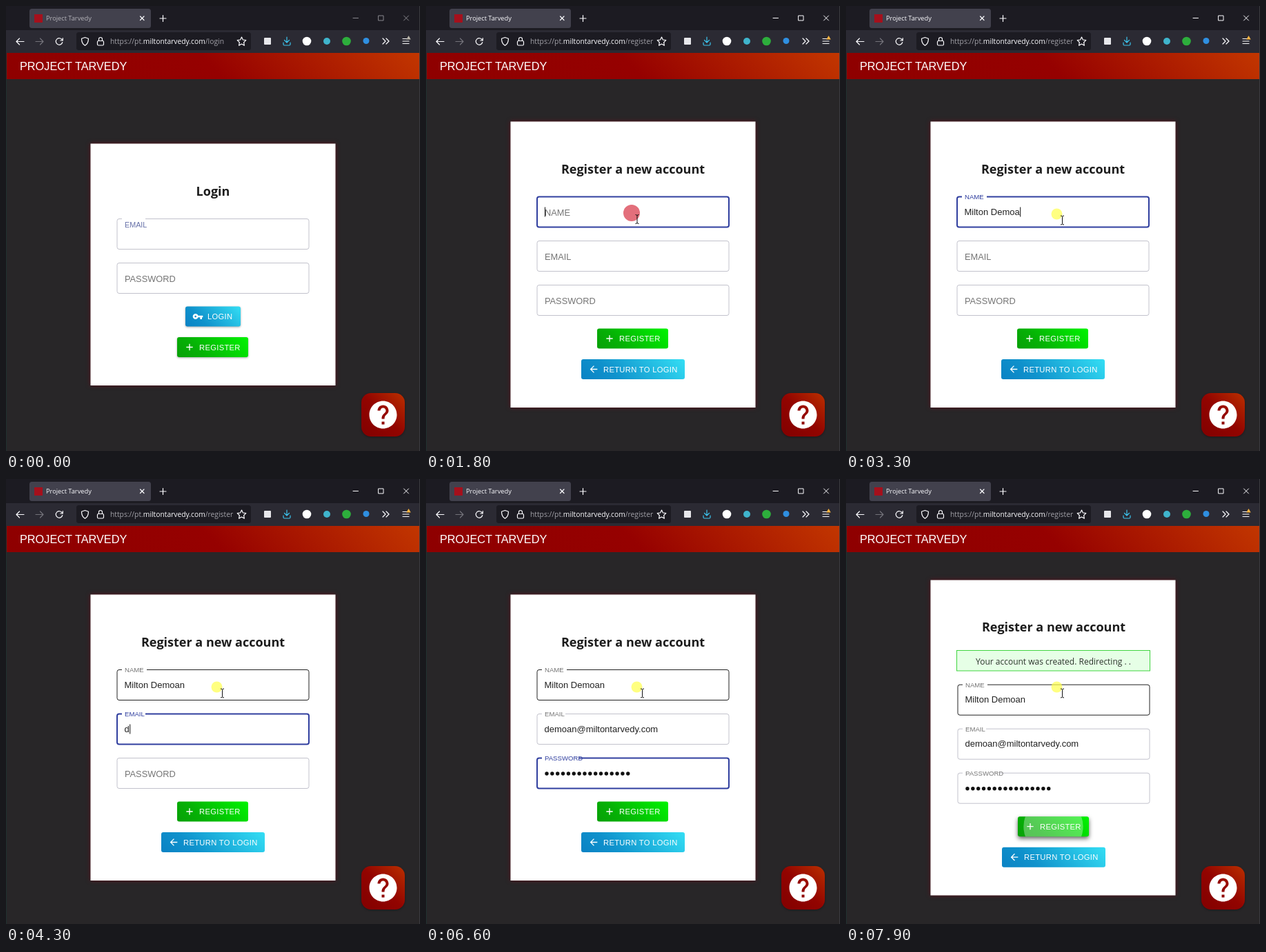
Recreate the animation shown at these times as an HTML page. Size 600 by 645 pixels, loop 8000 ms.

```html
<!DOCTYPE html>
<html lang="en">
<head>
<meta charset="utf-8">
<title>Register demo</title>
<style>
html, body { margin: 0; width: 100%; height: 100%; overflow: hidden; background: #282628; }
svg { display: block; width: 600px; height: 645px; }
text { font-family: "Liberation Sans", Arial, sans-serif; white-space: pre; }
.ui { font-family: "Open Sans", "Noto Sans", sans-serif; }
.mid { text-anchor: middle; }
.title { font-weight: 700; }
.btn { letter-spacing: .32px; }
.line { fill: none; stroke: #fbfbfe; stroke-width: 1.2; stroke-linecap: round; stroke-linejoin: round; }
.card { filter: drop-shadow(0 0 3px #7a001099); }
.low { filter: drop-shadow(0 1px 1.5px #0005); }
.high { filter: drop-shadow(0 3px 3px #0009); }
</style>
</head>
<body>
<svg id="stage" viewBox="0 0 600 645"></svg>
<script>
const LOOP = 8000, SITE = 'miltontarvedy.com', NAME = 'Milton Demoan', EMAIL = 'demoan@' + SITE;
const BLUE = '#303f9f', VALUE = 13;
const ICON = {
  help: 'M12 2C6.48 2 2 6.48 2 12s4.48 10 10 10 10-4.48 10-10S17.52 2 12 2zm1 17h-2v-2h2v2zm2.07-7.75l-.9.92C13.45 12.9 13 13.5 13 15h-2v-.5c0-1.1.45-2.1 1.17-2.83l1.24-1.26c.37-.36.59-.86.59-1.41 0-1.1-.9-2-2-2s-2 .9-2 2H8c0-2.21 1.79-4 4-4s4 1.79 4 4c0 .88-.36 1.68-.93 2.25z',
  key: 'M12.65 10C11.83 7.67 9.61 6 7 6c-3.31 0-6 2.69-6 6s2.69 6 6 6c2.61 0 4.83-1.67 5.65-4H17v4h4v-4h2v-4H12.65zM7 14c-1.1 0-2-.9-2-2s.9-2 2-2 2 .9 2 2-.9 2-2 2z',
  plus: 'M19 13h-6v6h-2v-6H5v-2h6V5h2v6h6v2z',
  back: 'M20 11H7.83l5.59-5.59L12 4l-8 8 8 8 1.41-1.41L7.83 13H20v-2z'
};

// Moments of the story, in ms
const T = { hover: 1150, activate: 1300, page: 1600, name: 1790, email: 3600, pass: 5900, button: 6800, done: 7300 };

const clamp = v => Math.max(0, Math.min(1, v));
const out = v => 1 - (1 - clamp(v)) ** 3;
const rect = (x, y, w, h, fill, more = '') => `<rect x="${x}" y="${y}" width="${w}" height="${h}" fill="${fill}" ${more}/>`;
const dot = (x, y, r, fill, more = '') => `<circle cx="${x}" cy="${y}" r="${r}" fill="${fill}" ${more}/>`;
const text = (x, y, s, size, fill, more = '') => `<text x="${x}" y="${y}" font-size="${size}" fill="${fill}" ${more}>${s}</text>`;
const line = (d, more = '') => `<path class="line" d="${d}" ${more}/>`;
const icon = (name, x, y, size, fill = '#fff') =>
  `<path d="${ICON[name]}" fill="${fill}" transform="translate(${x} ${y}) scale(${size / 24})"/>`;
const at = (x, y, s, more = '') => `<g transform="translate(${x} ${y})" ${more}>${s}</g>`;

// 45 degree gradient for a box centred on the origin
function slope(id, w, h, ...stops) {
  const k = (w + h) / 4;
  return `<linearGradient id="${id}" gradientUnits="userSpaceOnUse" x1="${-k}" y1="${k}" x2="${k}" y2="${-k}">` +
    stops.map(([o, c]) => `<stop offset="${o}" stop-color="${c}"/>`).join('') + '</linearGradient>';
}

const SKY = [[0, '#0a82c4'], [.3, '#0f92cc'], [1, '#34def4']];
const defs = '<defs>' +
  slope('head', 598, 38, [0, '#8e0000'], [.5, '#960100'], [1, '#c23600']) +
  slope('help', 63, 63, [0, '#820000'], [.5, '#920400'], [1, '#bb3000']) +
  slope('blueS', 80, 29, ...SKY) +
  slope('blueL', 150, 29, ...SKY) +
  slope('green', 103, 29, [0, '#08a008'], [.3, '#06b006'], [1, '#00f400']) +
  slope('dark', 103, 29, [0, '#04a804'], [1, '#00c400']) +
  '<clipPath id="clip"><rect x="-51.5" y="-14.5" width="103" height="29" rx="3"/></clipPath></defs>';

const fixed =
  rect(0, 0, 600, 35, '#1c1b22') + rect(0, 35, 600, 33, '#2b2a33') + rect(0, 106, 600, 539, '#282628') +
  rect(34, 4, 176, 28, '#42414d', 'rx="3.5"') + rect(41, 12, 12, 12, '#a5101c') +
  line('M194.5 15l5.5 5.5m0-5.5l-5.5 5.5M223 18h9m-4.5-4.5v9') +
  line('M26 51.5H15m4.5-4.5l-4.5 4.5 4.5 4.5') +
  line('M43 51.5h11m-4.5-4.5l4.5 4.5-4.5 4.5', 'opacity=".35"') +
  line('M81.5 49.5a4.8 4.8 0 1 0 .3 3M82.3 46.5v3.5h-3.5') +
  rect(102, 38, 253, 26, '#1c1b22', 'rx="3.5"') +
  line('M114.5 45.5l5 1.8c0 5-1.5 8-5 10-3.5-2-5-5-5-10z') +
  rect(132.5, 50.5, 9, 6.5, 'none', 'rx="1.5" stroke="#fbfbfe" stroke-width="1.2"') +
  line('M134.5 50.5v-2.5a2.5 2.5 0 0 1 5 0v2.5') +
  line('M341.5 45l1.9 4 4.4.6-3.2 3.1.8 4.4-3.9-2.1-3.9 2.1.8-4.4-3.2-3.1 4.4-.6z') +
  rect(374, 46, 10, 10, '#e8e8ec', 'rx="1"') +
  line('M407 45v8m-3.5-3.5l3.5 3.5 3.5-3.5M402 53v2.5q0 1.5 1.5 1.5h7q1.5 0 1.5-1.5v-2.5', 'style="stroke:#3cc4ee"') +
  dot(436, 51, 6.3, '#fff') + dot(465, 51, 5, '#3fb4cc') + dot(493.5, 51, 6.3, '#2dae3c') + dot(522, 50.5, 4.5, '#2f8fe0') +
  line('M546 47l4 4-4 4M551 47l4 4-4 4M575 47.5h6M575 51h9M575 54.5h9') +
  at(299, 87, rect(-299, -19, 600, 38, 'url(#head)')) +
  text(20, 92.5, 'PROJECT TARVEDY', 16.3, '#fff') +
  at(546.5, 592.5, rect(-31.5, -31.5, 63, 63, 'url(#help)', 'rx="14"') + icon('help', -24, -24, 48), 'class="low"') +
  rect(0, 68, 1, 577, '#20302f') + rect(599, 0, 1, 645, '#3c3c40');

function chrome(t) {
  const awake = t >= T.activate, color = awake ? '#fbfbfe' : '#88878d';
  const path = t < T.page ? '/login' : '/register';
  const hover = t >= T.hover && t < T.page;
  return text(58, 21.3, 'Project Tarvedy', 9.25, awake ? '#fbfbfe' : '#b5b4ba', 'class="ui"') +
    line('M503 17.5h7.5M540 14h7v7h-7zM576.5 14l7 7m0-7l-7 7', `style="stroke:${color};stroke-width:1"`) +
    `<path d="M583.5 43l3.2 5.5h-6.4z" fill="${awake ? '#ffb640' : '#b9b4a8'}"/>` +
    text(151, 55, `https://pt.<tspan fill="#fbfbfe">${SITE}</tspan>${path}`, 10.3, '#a3a2a9', 'class="ui"') +
    (hover ? rect(-.5, 628.5, 167, 17, '#2b2a33', 'stroke="#6a6972"') +
      text(4, 640, `https://pt.${SITE}/register`, 9.1, '#fbfbfe', 'class="ui"') : '');
}

const pen = document.createElement('canvas').getContext('2d');
pen.font = VALUE + 'px "Liberation Sans", Arial, sans-serif';

// lift: 0 = label inside the field, 1 = label on the border
function field(y, label, lift, o = {}) {
  const { value = '', hidden, focus, hover, caret, gap = 204, tint = '#757575' } = o;
  const color = focus ? BLUE : hover ? '#222' : '#c2c2cc';
  const end = 168 + (gap - 168) * clamp(lift * 1.5);
  const body = hidden
    ? [...value].map((_, i) => dot(175 + 7.85 * i, y + 22.5, 2.7, '#111')).join('')
    : text(171.5, y + 26, value, VALUE, '#222');
  const cx = 172 + (hidden ? 7.85 * value.length : pen.measureText(value).width);
  return rect(161, y, 278, 44, 'none', `rx="3" stroke="${color}" stroke-width="${focus ? 2 : 1}"`) +
    (lift > 0 ? rect(168, y - 1.5, end - 168, 3, '#fff') : '') + body +
    text(172, y + 27 - 23.5 * lift, label, 12.8 - 3.2 * lift, focus && lift > 0 ? BLUE : tint) +
    (caret ? rect(cx, y + 15, 1, 14, '#111') : '');
}

function button(x, y, w, fill, name, label, cls = '', ripple = '') {
  const left = -w / 2;
  return at(x, y, rect(left, -14.5, w, 29, `url(#${fill})`, `rx="3" class="${cls}"`) + ripple +
    icon(name, left + 10, -8, 16) + text(left + 32, 4.2, label, 11.2, '#fff', 'class="btn"'));
}

const card = (y, h) => rect(122.5, y, 355, h, '#fff', 'class="card"');
const title = (y, s) => text(300, y, s, 18, '#1c1c1c', 'class="ui mid title"');

function login(t) {
  const hover = t >= T.hover, lift = .64 * (1 - clamp(t / 130)) ** 2;
  return card(199.5, 350.5) + title(275, 'Login') +
    field(308.5, 'EMAIL', lift, { tint: lift > .05 ? '#6670a8' : undefined }) +
    field(372.5, 'PASSWORD', 0) +
    button(300, 450, 80, 'blueS', 'key', 'LOGIN', 'low') +
    button(299.5, 494.5, 103, hover ? 'dark' : 'green', 'plus', 'REGISTER', hover ? 'high' : 'low');
}

// Typed part of s, and whether the caret shows
function typing(t, s, focus, blur, start, step) {
  const n = Math.max(0, Math.min(s.length, Math.floor((t - start) / step) + 1));
  const last = n ? start + (n - 1) * step : focus;
  const on = t >= focus && t < blur;
  return { value: s.slice(0, n), focus: on, caret: on && (t - last) % 1000 < 500 };
}

function register(t) {
  const done = t >= T.done;
  const lift = from => out((t - from - 40) / 200);
  const name = typing(t, NAME, T.name, T.email, 2410, 80);
  const email = typing(t, EMAIL, T.email, T.pass, 4240, 70);
  const pass = typing(t, '*'.repeat(16), T.pass, T.button, 6050, 1);
  const active = t >= T.button, age = t - T.button;
  const r = out(age / 550) * (45 + 2 * Math.cos(age / 2500 * 2 * Math.PI));
  const ripple = active ? `<g clip-path="url(#clip)">${dot(0, 0, r, '#fff', 'opacity=".32"')}</g>` : '';
  const form =
    field(276.5, 'NAME', lift(T.name), { ...name, hover: true }) +
    field(340.5, 'EMAIL', lift(T.email), { ...email, gap: 202 }) +
    field(404.5, 'PASSWORD', lift(T.pass), { ...pass, hidden: true, gap: 222 }) +
    button(299.5, 482, 103, 'green', 'plus', 'REGISTER', active ? 'high' : '', ripple) +
    button(300, 526.5, 150, 'blueL', 'back', 'RETURN TO LOGIN');
  const heading = 'Register a new account';
  if (!done) return card(167.5, 414.5) + title(243, heading) + form;
  const dots = ' .'.repeat(Math.floor((t - T.done) / 250));
  return card(146.5, 457) + at(1, 0, title(221, heading)) +
    rect(160.5, 248.5, 280, 29.5, '#e6ffe6', 'stroke="#3fd53f"') +
    text(300.5, 268.5, 'Your account was created. Redirecting' + dots, 12, '#2c332c', 'class="ui mid"') +
    at(1, 21.7, form);
}

// Pointer stops: time, x, y
const PATH = [[700, 612, 400], [1200, 328, 492], [1500, 328, 492], [1780, 298, 300], [1900, 298, 300], [2100, 305.5, 301.5]];

function pointer(t) {
  if (t < PATH[0][0]) return '';
  let [, x, y] = PATH[PATH.length - 1];
  for (let i = 1; i < PATH.length; i++) {
    const [a, ax, ay] = PATH[i - 1], [b, bx, by] = PATH[i];
    if (t >= a && t < b) {
      const u = (t - a) / (b - a), k = u * u * (3 - 2 * u);
      x = ax + (bx - ax) * k;
      y = ay + (by - ay) * k;
    }
  }
  const press = (t >= T.activate && t < 1550) || (t >= 1700 && t < 1950);
  const halo = press ? dot(0, 0, 12, '#d83848', 'opacity=".72"') : dot(0, 0, 8, '#ffff50', 'opacity=".72"');
  const hand = '<path d="M3-1.5q0-2 1.5-2t1.5 2v5.5q2-1 3 .5 2-.8 2.7.8 2.3-.5 2.3 2v5q0 3-2 4v2H5v-2l-5-6.5q-1-2 .8-2.4 1-.2 2.2 1.4z" fill="#fff" stroke="#111"/>';
  const beam = '<path d="M5.5 2.5q2.5 0 2.5 1.5 0-1.5 2.5-1.5M8 4v10M5.5 15.5q2.5 0 2.5-1.5 0 1.5 2.5 1.5" fill="none" stroke="#111"/>';
  const arrow = '<path d="M2 0v15l3.5-3.3 2.3 5.3 2.2-1-2.3-5.1h4.8z" fill="#fff" stroke="#111" stroke-width=".8"/>';
  const shape = t < T.hover ? arrow : t < T.page ? hand : t < 1700 ? arrow : beam;
  return at(x, y, halo + shape);
}

const stage = document.getElementById('stage');
stage.innerHTML = defs + fixed + '<g id="live"></g>';
const live = document.getElementById('live');
const begin = performance.now();

function draw() {
  const t = (performance.now() - begin) % LOOP;
  live.innerHTML = (t < T.page ? login(t) : register(t)) + chrome(t) + pointer(t);
  requestAnimationFrame(draw);
}
draw();
</script>
</body>
</html>
```
